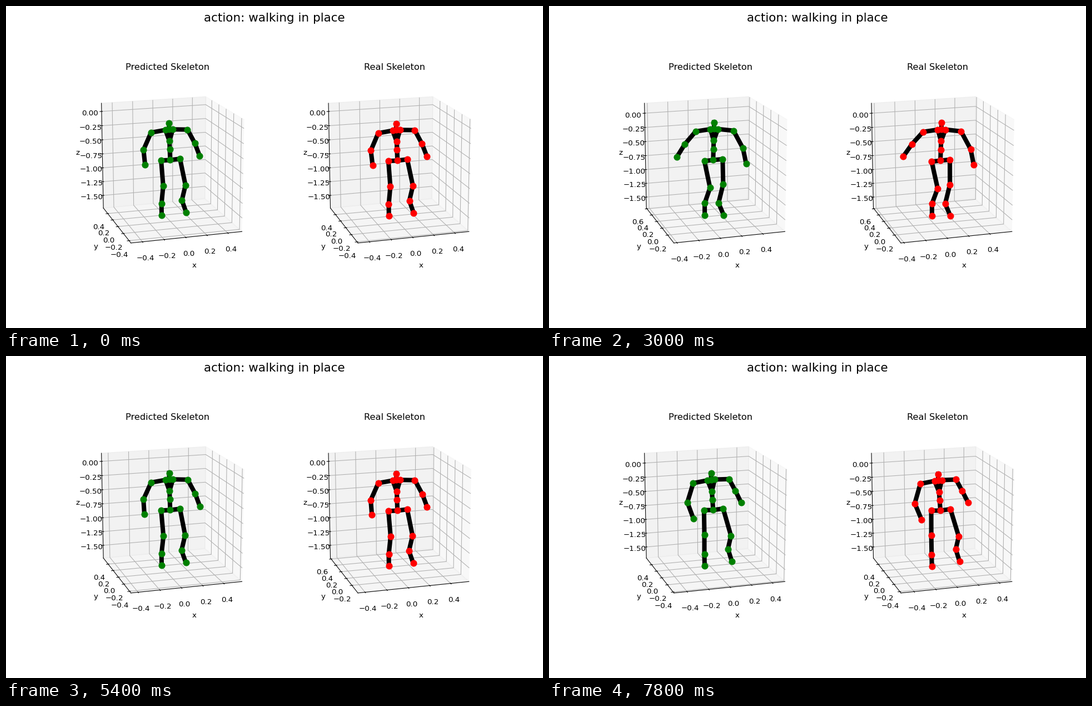
Recreate the animation shown at these times as a matplotlib script. Size 966x580 px, loop 8 s.

```python
import numpy as np
import matplotlib.pyplot as plt
from matplotlib.animation import FuncAnimation

W, H, DPI = 966, 580, 96.6
POSES, HOLD = 14, 3
STRIDE = 15.2  # poses per full step cycle

# Rest position (x, y) in stage pixels, and how far the joint sways with the stride.
JOINTS = {
    "pelvis": (295.3, 278, 0, 0),
    "head": (294.2, 211, -2.9, 1),
    "r_shoulder": (261.6, 228, -2.4, 1.7),
    "r_elbow": (246.6, 257, 2.6, 8),
    "r_wrist": (245.2, 283, 16.3, 11.5),
    "l_shoulder": (327.8, 223.6, -4.4, -1.6),
    "l_elbow": (342, 250, -7.4, -7.2),
    "l_wrist": (350, 274.2, -5, -11),
    "r_hip": (279.2, 278.9, -0.4, -0.9),
    "r_knee": (284.5, 325.4, -5.6, -2.7),
    "r_ankle": (279.8, 356.6, -0.3, 0.9),
    "r_foot": (280, 377.8, -0.1, 0.5),
    "l_hip": (312.8, 275.8, 0.5, -0.5),
    "l_knee": (320.5, 322.8, 7.7, 1.7),
    "l_ankle": (313.6, 351.6, 9.3, -4),
    "l_foot": (321.7, 373.6, 8, -4),
}
CHAINS = [["pelvis", "spine", "chest", "neck", "head"]]
for side in ("r_", "l_"):
    CHAINS.append(["chest"] + [side + n for n in ("collar", "shoulder", "elbow", "wrist")])
    CHAINS.append(["pelvis"] + [side + n for n in ("hip", "knee", "ankle", "foot")])


def wave(k, peak, period=STRIDE):
    return np.cos(2 * np.pi * (k - peak) / period)


def between(a, b, share):
    return a + share * (b - a)


def pose(k, reach):
    swing = reach * wave(k, 12.2)
    j = {n: np.array([x + dx * swing, y + dy * swing])
         for n, (x, y, dx, dy) in JOINTS.items()}
    j["neck"] = j["head"] + (0, 11.3)
    j["spine"] = between(j["pelvis"], j["neck"], 0.345)
    j["chest"] = between(j["pelvis"], j["neck"], 0.62)
    for side in ("r_", "l_"):
        j[side + "collar"] = between(j["neck"], j[side + "shoulder"], 0.2)
    return j


def frame_axis(set_ticks, set_lim, low, high, step):
    """Ticks lie inside [low, high]; the box is 1/48 wider on each side."""
    ticks = step * np.arange(np.ceil(low / step), np.floor(high / step) + 1) + 0.0
    pad = (high - low) / 48
    set_ticks(ticks)
    set_lim(low - pad, high + pad)


class Panel:
    def __init__(self, fig, slot, title, color, offset, reach, depth):
        self.offset, self.reach, self.depth = offset, reach, depth
        self.ax = ax = fig.add_subplot(1, 2, slot, projection="3d")
        ax.set_box_aspect((1, 1, 1))
        ax.view_init(elev=15.6, azim=-107)
        ax.set_title(title)
        ax.set(xlabel="x", ylabel="y", zlabel="z")
        on_stage = dict(transform=fig.transFigure)
        self.bones = plt.Line2D([], [], color="black", lw=6, zorder=5, **on_stage)
        self.dots = plt.Line2D([], [], color=color, ls="", marker="o", ms=8, zorder=6, **on_stage)
        fig.add_artist(self.bones)
        fig.add_artist(self.dots)

    def to_stage(self, points):
        p = np.array(points) + self.offset
        return p[:, 0] / W, 1 - p[:, 1] / H

    def show(self, k):
        # The box follows the pelvis: it sways once and bobs twice per stride.
        x = 0.048 + 0.047 * wave(k, 5.6)
        y = self.depth(k)
        z = -0.68 + 0.018 * wave(k, 4.6, STRIDE / 2)
        ax = self.ax
        frame_axis(ax.set_xticks, ax.set_xlim, x - 0.5, x + 0.5, 0.2)
        frame_axis(ax.set_yticks, ax.set_ylim, y - 0.5, y + 0.5, 0.2)
        frame_axis(ax.set_zticks, ax.set_zlim, z - 1.0, z + 0.8, 0.25)

        joints = pose(k, self.reach)
        path = []
        for chain in CHAINS:
            path += [joints[name] for name in chain] + [np.full(2, np.nan)]
        self.bones.set_data(*self.to_stage(path))
        self.dots.set_data(*self.to_stage(list(joints.values())))


# The tiny surplus keeps the pixel size from being rounded down.
fig = plt.figure(figsize=((W + 0.001) / DPI, (H + 0.001) / DPI), dpi=DPI)
fig.suptitle("action: walking in place", fontsize=16)
panels = [
    Panel(fig, 1, "Predicted Skeleton", "green", (0, -0.5), 0.94,
          lambda k: 0.088 + 0.03 * wave(k, 3.8, STRIDE / 2)),
    Panel(fig, 2, "Real Skeleton", "red", (408.8, 0.5), 1.06,
          lambda k: 0.097 + 0.018 * wave(k, 3.9, 5.6)),
]


def update(i):
    for panel in panels:
        panel.show(i // HOLD)
    return []


# 40 steps of 200 ms; the last pose is held for a single step.
anim = FuncAnimation(fig, update, frames=(POSES - 1) * HOLD + 1, interval=200,
                     repeat=True, repeat_delay=0, blit=False)
plt.show()
```
